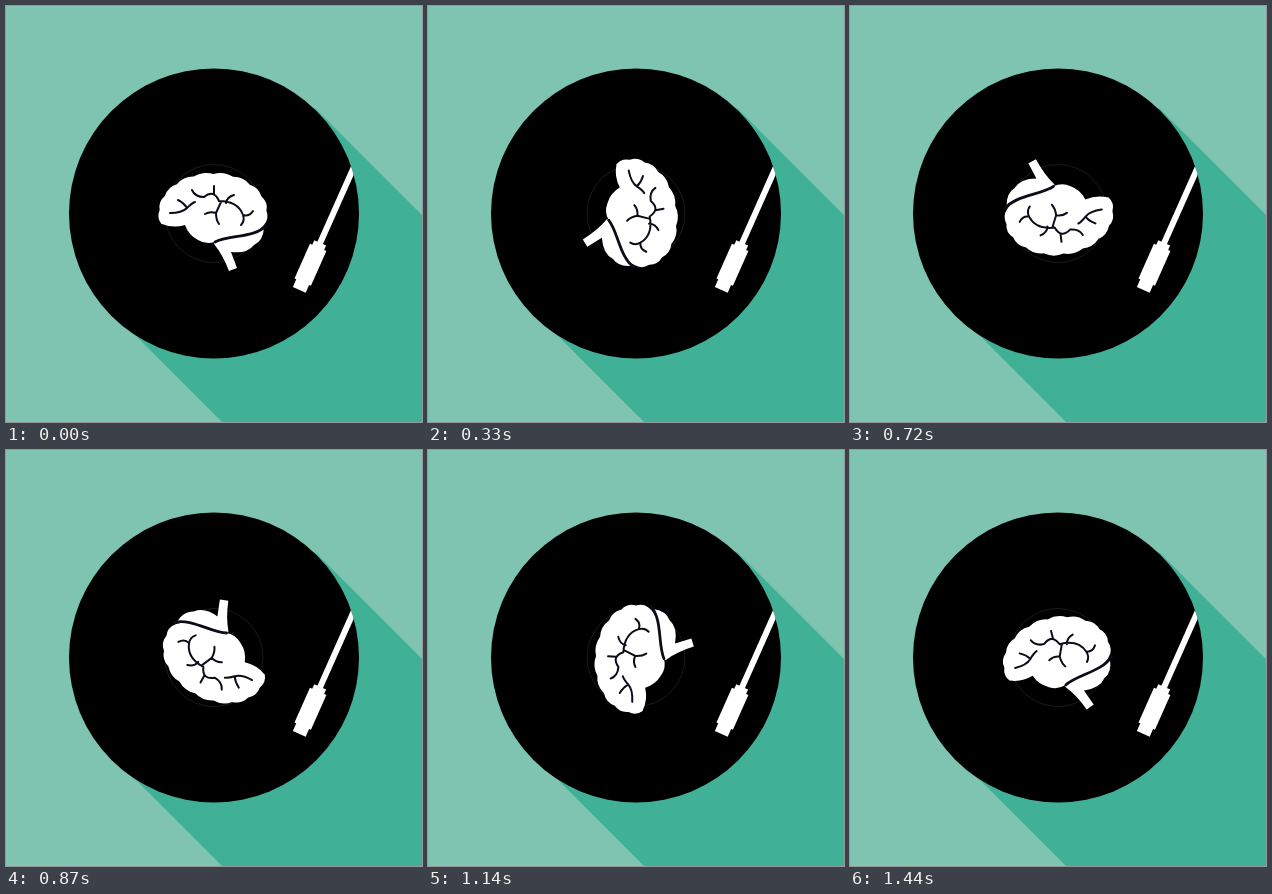
Recreate the animation shown at these times as an HTML page with a canvas. Size 416x416 px, loop 1470 ms.

```html
<!DOCTYPE html>
<html lang="en">
<head>
<meta charset="utf-8">
<title>Brain record</title>
<style>
  html, body { margin: 0; width: 100%; height: 100%; overflow: hidden; background: #7fc4b1; }
  canvas { display: block; width: 416px; height: 416px; }
</style>
</head>
<body>
<canvas id="stage" width="416" height="416"></canvas>
<script>
const ctx = document.getElementById('stage').getContext('2d');
const SIZE = 416, CENTER = 208, RECORD_Y = 207.5, RADIUS = 145;
const STEP_MS = 30, STEPS = 49, STEP_ANGLE = Math.PI * 2 / 50;
const rad = degrees => degrees * Math.PI / 180;

// Curves from a to b, bulging to the left of the direction of travel.
function bump(path, [ax, ay], [bx, by], bulge) {
  const dx = bx - ax, dy = by - ay, len = Math.hypot(dx, dy);
  path.quadraticCurveTo((ax + bx) / 2 + dy / len * bulge, (ay + by) / 2 - dx / len * bulge, bx, by);
}

function bumps(path, points, bulge) {
  path.lineTo(...points[0]);
  for (let i = 1; i < points.length; i++) bump(path, points[i - 1], points[i], bulge);
}

// The crown is a scalloped elliptical arc, from lower left over the top to the right.
function crownPoints(count) {
  return Array.from({ length: count + 1 }, (_, i) => {
    const angle = rad(163 + i / count * 215);
    return [207 + 53.5 * Math.cos(angle), 207 + 39 * Math.sin(angle)];
  });
}

const fissure = new Path2D('M260 220C248 232 222 229 209 236');
const cerebrum = new Path2D();
bumps(cerebrum, crownPoints(10), 4.5);
cerebrum.bezierCurveTo(248, 232, 222, 229, 209, 236);
bumps(cerebrum, [[209, 236], [192, 234], [179, 219], [156, 218]], 4);

const cerebellum = new Path2D(
  'M208 236L258 222Q257 235 248 239Q241 248 225 246L231 262L223 265Q217 249 208 238Z');

const folds = new Path2D(
  'M164 207Q176 207 181 202T189 196M172 194Q178 197 181 202' +
  'M186 184Q189 191 198 191Q208 183 213 195Q232 195 237 209Q239 215 235 219' +
  'M208 180V188M228 189Q221 191 220 197M247 205Q243 211 237 209' +
  'M199 208Q204 205 210 207L215 196M210 207Q210 214 213 218');

function fillBetween(...points) {
  ctx.beginPath();
  points.forEach(point => ctx.lineTo(...point));
  ctx.fill();
}

function disc(radius) {
  ctx.beginPath();
  ctx.arc(CENTER, RECORD_Y, radius, 0, Math.PI * 2);
}

function drawRecord() {
  ctx.fillStyle = '#7fc4b1';
  ctx.fillRect(0, 0, SIZE, SIZE);
  // The long shadow falls at 45 degrees.
  ctx.fillStyle = '#40b197';
  fillBetween([CENTER, 1], [SIZE, 209], [SIZE, SIZE], [216, SIZE], [8, CENTER]);
  ctx.fillStyle = '#7fc4b1';
  fillBetween([0, 0], [309, 0], [309, 102], [106, 306], [0, 306]);
  ctx.fillStyle = '#000';
  disc(RADIUS);
  ctx.fill();
  ctx.strokeStyle = '#222';
  ctx.lineWidth = 0.8;
  disc(49);
  ctx.stroke();
}

function drawArm() {
  ctx.save();
  disc(RADIUS);
  ctx.clip();
  ctx.fillStyle = '#fff';
  ctx.translate(314.2, 236.8);
  ctx.rotate(rad(24));
  ctx.fillRect(-3, -95, 6, 96);
  ctx.fillRect(-6.5, 0, 13, 6);
  ctx.fillRect(-9, 5, 18, 38);
  ctx.fillRect(-7, 42, 14, 9.5);
  ctx.restore();
}

function drawBrain(angle) {
  ctx.save();
  ctx.translate(CENTER, CENTER);
  ctx.rotate(angle);
  ctx.translate(-CENTER, -CENTER);
  ctx.fillStyle = '#fff';
  ctx.fill(cerebellum);
  ctx.fill(cerebrum);
  ctx.strokeStyle = '#0c0c18';
  ctx.lineCap = ctx.lineJoin = 'round';
  ctx.lineWidth = 2;
  ctx.stroke(folds);
  ctx.lineWidth = 2.8;
  ctx.stroke(fissure);
  ctx.restore();
}

function render(now) {
  const step = Math.floor(now / STEP_MS) % STEPS;
  drawRecord();
  drawBrain(step * STEP_ANGLE);
  drawArm();
  requestAnimationFrame(render);
}

render(0);
</script>
</body>
</html>
```
